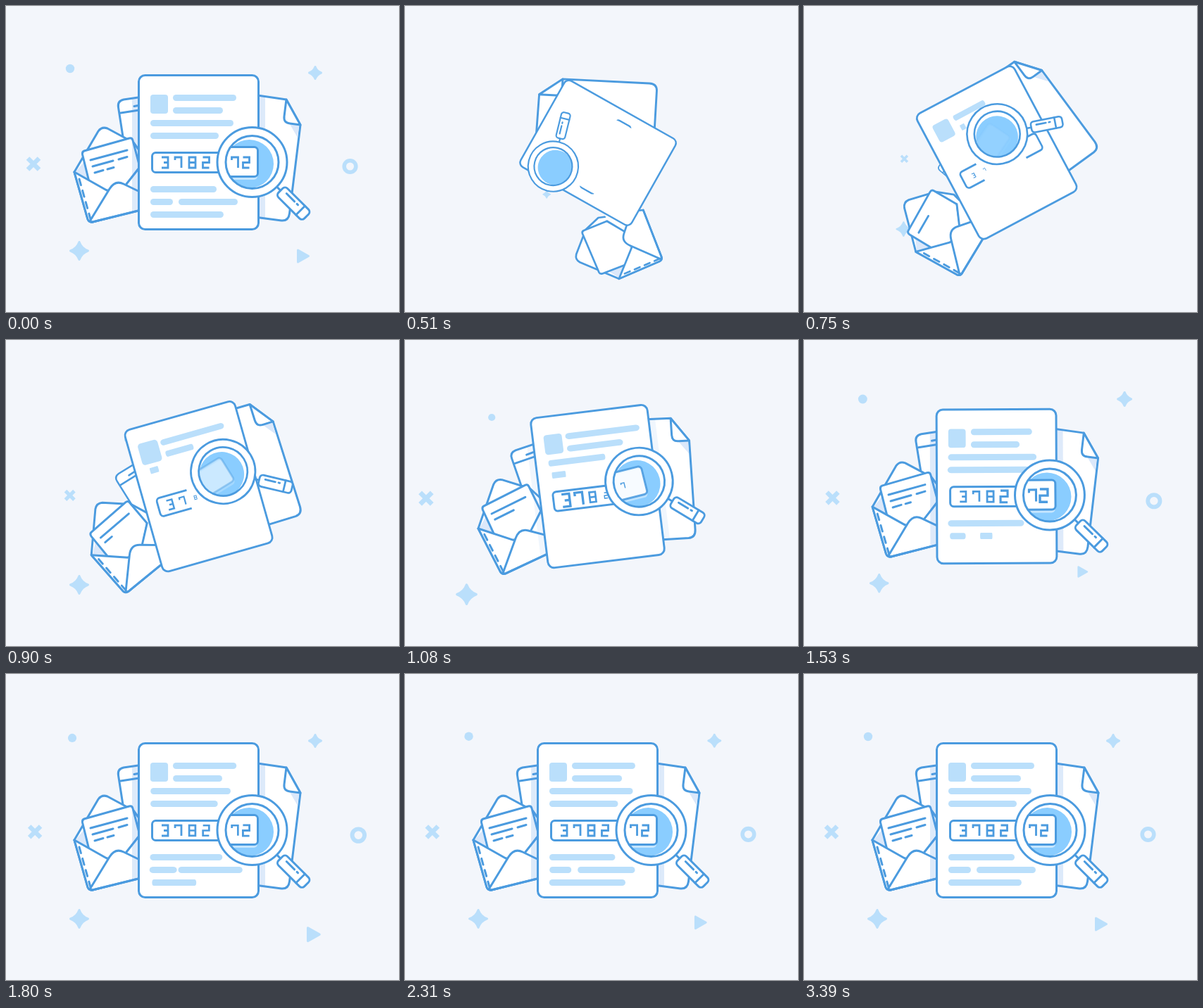
Animation, 558 px wide and 435 px high, one loop 3510 ms. Source, as an HTML page with a canvas:

```html
<!DOCTYPE html>
<html lang="en">
<head>
<meta charset="utf-8">
<title>Document search</title>
<style>
html, body { margin: 0; width: 100%; height: 100%; overflow: hidden; background: #f3f6fb; }
canvas { display: block; width: 558px; height: 435px; }
</style>
</head>
<body>
<canvas id="stage"></canvas>
<script>
const LOOP = 3510, STEP = 30;
const CX = 273.5, CY = 208;
const LINE = '#4b9bdf', PALE = '#badffb', LENS = '#8acdff';
const canvas = document.getElementById('stage');
const ctx = canvas.getContext('2d');
const dpr = window.devicePixelRatio || 1;
canvas.width = 558 * dpr;
canvas.height = 435 * dpr;

const clamp = v => Math.max(0, Math.min(1, v));
const rad = d => d * Math.PI / 180;

// Linear approach until s = 0, then a damped overshoot with the same speed.
function spring(s, speed) {
  if (s < 0) return Math.max(0, 1 + speed * s);
  const w = Math.PI / 450;
  return 1 + speed / w * Math.exp(-0.004 * s) * Math.sin(w * s);
}

function group(x, y, angle, sx, sy, draw) {
  if (sx <= 0 || sy <= 0) return;
  ctx.save();
  ctx.translate(x, y);
  ctx.rotate(rad(angle));
  ctx.scale(sx, sy);
  ctx.translate(-x, -y);
  draw();
  ctx.restore();
}

function paint(fill, stroke = LINE, width = 3) {
  if (fill) { ctx.fillStyle = fill; ctx.fill(); }
  if (stroke) { ctx.strokeStyle = stroke; ctx.lineWidth = width; ctx.stroke(); }
}

function box(x, y, w, h, r, fill, stroke, width) {
  ctx.beginPath();
  ctx.roundRect(x, y, w, h, r);
  paint(fill, stroke, width);
}

function disc(x, y, r, fill, stroke, width) {
  ctx.beginPath();
  ctx.arc(x, y, r, 0, 7);
  paint(fill, stroke, width);
}

function line(...p) {
  ctx.beginPath();
  for (let i = 0; i < p.length; i += 2) ctx.lineTo(p[i], p[i + 1]);
  paint(null);
}

function shape(d, fill, stroke, width) {
  const path = new Path2D(d);
  if (fill) { ctx.fillStyle = fill; ctx.fill(path); }
  if (stroke !== null) {
    ctx.strokeStyle = stroke || LINE;
    ctx.lineWidth = width || 3;
    ctx.stroke(path);
  }
}

// x, y, width, time of arrival
const BARS = [
  [237, 126, 90, 870], [237, 144, 71, 1020], [205, 162, 118, 1170], [205, 180, 97, 1320],
  [205, 256, 94, 1470], [205, 274, 32, 1620], [245, 274, 84, 1770], [205, 292, 104, 1920]
];
const GLYPHS = {
  3: 'M0 0H9V15H0M3 7.5H9',
  7: 'M0 4V0H9V15',
  8: 'M0 0H9V15H0ZM0 7.5H9',
  2: 'M0 0H9V7.5H0V15H9'
};
// digit, x, y, time of arrival
const DIGITS = [[3, 221, 215, 920], [7, 240, 215, 960], [8, 260, 215, 1090], [2, 279.5, 215, 1220]];
const LENS_DIGITS = [[7, 320.5, 215, 1220], [2, 336.5, 215, 1380]];
// x1, y1, x2, y2, start
const NOTES = [
  [120, 219, 172, 205, 600], [123, 228, 152, 220, 780], [160, 218, 172, 214.5, 1080],
  [126, 237, 138, 233.5, 1110], [144, 232, 153, 229.5, 1300]
];

function digits(list, t) {
  for (const [n, x, y, at] of list) {
    const g = spring(t - at, 0.0033);
    group(x + 4.5, y + 7.5, 0, g, g, () => {
      ctx.translate(x, y);
      ctx.lineCap = 'butt';
      ctx.lineJoin = 'miter';
      shape(GLYPHS[n], null, LINE, 2.8);
    });
  }
}

function sheet() {
  shape('M330 123L398 133L418 169L402.5 295Q401 306 391 305L330 297Z', '#fff');
  shape('M403 168L416 170L414 187Z', '#dbe8fa', null);
  shape('M398 133L395 157Q394 166 403 167L418 169Z', '#fff');
}

function browser() {
  shape('M215 126L167 133Q158 135 159.5 144L176 250L215 250Z', '#fff');
  line(163, 152, 215, 144);
  line(182, 142.5, 196, 140);
}

function envelope(t) {
  shape('M97 236L131 178Q136 171 144 174L181 194L197 216L197 288L123 307Q118 308 116 303Z', '#fff');
  shape('M98 237L111 221L120 250Z', '#dbe8fa', null);
  shape('M111 206L175 188Q179 187 180 191L190 229L165 262L121 262L108.5 211Q108 207 111 206Z', '#fff');
  for (const [x1, y1, x2, y2, at] of NOTES) {
    const p = clamp((t - at) / 280);
    if (p) line(x1, y1, x1 + (x2 - x1) * p, y1 + (y2 - y1) * p);
  }
  shape('M97 236L143 262L171 253L190 229L200 227L200 288L123 307Q118 308 116 303Z', '#fff', null);
  line(97, 236, 143, 262);
  line(171, 253, 190, 229);
  shape('M119 306L147 260Q155 247 167 253L200 269L200 288L123 307Z', '#fff');
  shape('M97 236L116 303Q118 308 123 307L200 288');
  ctx.save();
  ctx.setLineDash([9, 8]);
  line(104, 246, 120, 303);
  ctx.restore();
}

function page(t) {
  box(188.5, 98.5, 170, 219, 9, '#fff');
  const g = spring(t - 720, 0.0033);
  group(217.5, 139.5, 0, g, g, () => box(205, 126, 25, 27, 4, PALE, null));
  for (const [x, y, w, at] of BARS) {
    group(x + 6, y, 0, spring(t - at, 0.0033), 1, () => box(x, y, w, 9, 4.5, PALE, null));
  }
  const half = 68 * clamp((t - 480) / 580);
  if (half) {
    ctx.save();
    ctx.beginPath();
    ctx.rect(205.5, 200, half, 50);
    ctx.rect(341.5 - half, 200, half, 50);
    ctx.clip();
    box(207.5, 208.5, 132.5, 28, 5, '#fff');
    ctx.restore();
  }
  digits(DIGITS, t);
}

function magnifier(t) {
  group(349.5, 222, 45, 1, 1, () => {
    ctx.translate(349.5, 222);
    line(50, 0, 57, 0);
    box(57, -9, 52, 18, 5, '#fff');
    line(97, -9, 97, 9);
    line(66, -3, 82, -3);
    line(87, -3, 89, -3);
  });
  disc(349.5, 222, 49.5, '#fff');
  ctx.save();
  ctx.beginPath();
  ctx.arc(349.5, 222, 37, 0, 7);
  ctx.clip();
  disc(345.5, 224.5, 34.5, LENS, null);
  ctx.globalAlpha = clamp((t - 730) / 400);
  box(290, 204, 67, 43, 5, '#c6e6ff', null);
  box(290, 200.5, 67.5, 42, 5, '#fff');
  ctx.globalAlpha = 1;
  digits(LENS_DIGITS, t);
  ctx.restore();
  disc(349.5, 222, 37.5, null);
}

function star(x, y, r) {
  const k = r * 0.24, q = r - 1.5;
  shape(`M${x} ${y - q}Q${x + k} ${y - k} ${x + q} ${y}Q${x + k} ${y + k} ${x} ${y + q}` +
    `Q${x - k} ${y + k} ${x - q} ${y}Q${x - k} ${y - k} ${x} ${y - q}Z`, PALE, PALE, 3);
}

// time of arrival, drawing
const SPARKS = [
  [900, () => star(104, 348, 14)],
  [1050, () => {
    ctx.lineCap = 'butt';
    shape('M31 216.5L47 232.5M47 216.5L31 232.5', null, PALE, 6.5);
  }],
  [1200, () => disc(91, 89, 6.2, PALE, null)],
  [1350, () => star(439, 95, 10)],
  [1500, () => disc(488.5, 228, 8.3, null, PALE, 5.6)],
  [1650, () => shape('M414.5 347V364L429.5 355.5Z', PALE, PALE, 3)]
];

// Everything behind the page swings a little further than the page itself.
function papers(t, e) {
  const tuck = 1 - 0.4 * e * e;
  group(CX, CY, -13 * e, 1, 1, () => {
    ctx.save();
    ctx.translate(-9 * e, -6 * e);
    group(385, 215, -2.5 * e, 1 + 0.08 * e, 1 + 0.08 * e, sheet);
    ctx.restore();
    // the left side drifts outwards along the tilted axis
    ctx.translate(-16 * e, 2 * e);
    group(CX, CY, 0, tuck, tuck, browser);
    group(150, 240, -4 * e, 1 + 0.04 * e, 1 + 0.04 * e, () => envelope(t));
  });
}

function render(t) {
  ctx.setTransform(dpr, 0, 0, dpr, 0, 0);
  ctx.clearRect(0, 0, 558, 435);
  if (t >= 30 && t < 150) return;
  if (t < 30) t = 3480;
  ctx.lineCap = ctx.lineJoin = 'round';

  const e = Math.pow(Math.max(0, 1877 - t) / 1127, 4);
  const size = (1 - 0.08 * e) * clamp((t - 120) / 250);
  group(CX + Math.min(e, 1), CY, -28 * e, size, size, () => {
    papers(t, e);
    ctx.globalCompositeOperation = 'source-atop';
    box(179, 98, 189, 220, 8, `rgba(86,150,232,${0.2 * clamp(1 - 2.2 * e)})`, null);
    ctx.globalCompositeOperation = 'source-over';
    page(t);
    ctx.translate(-62 * e, -39 * Math.pow(e, 0.75));
    const near = 1 - 0.06 * e;
    group(349.5, 222, -28 * e, near, near, () => magnifier(t));
  });

  ctx.globalCompositeOperation = 'destination-over';
  for (const [at, draw] of SPARKS) {
    const g = spring(t - at, 0.00147);
    group(CX, CY, 0, g, g, draw);
  }
  ctx.globalCompositeOperation = 'source-over';
}

const start = performance.now();
function tick() {
  const t = (performance.now() - start) % LOOP;
  render(Math.floor(t / STEP) * STEP);
  requestAnimationFrame(tick);
}
tick();
</script>
</body>
</html>
```
